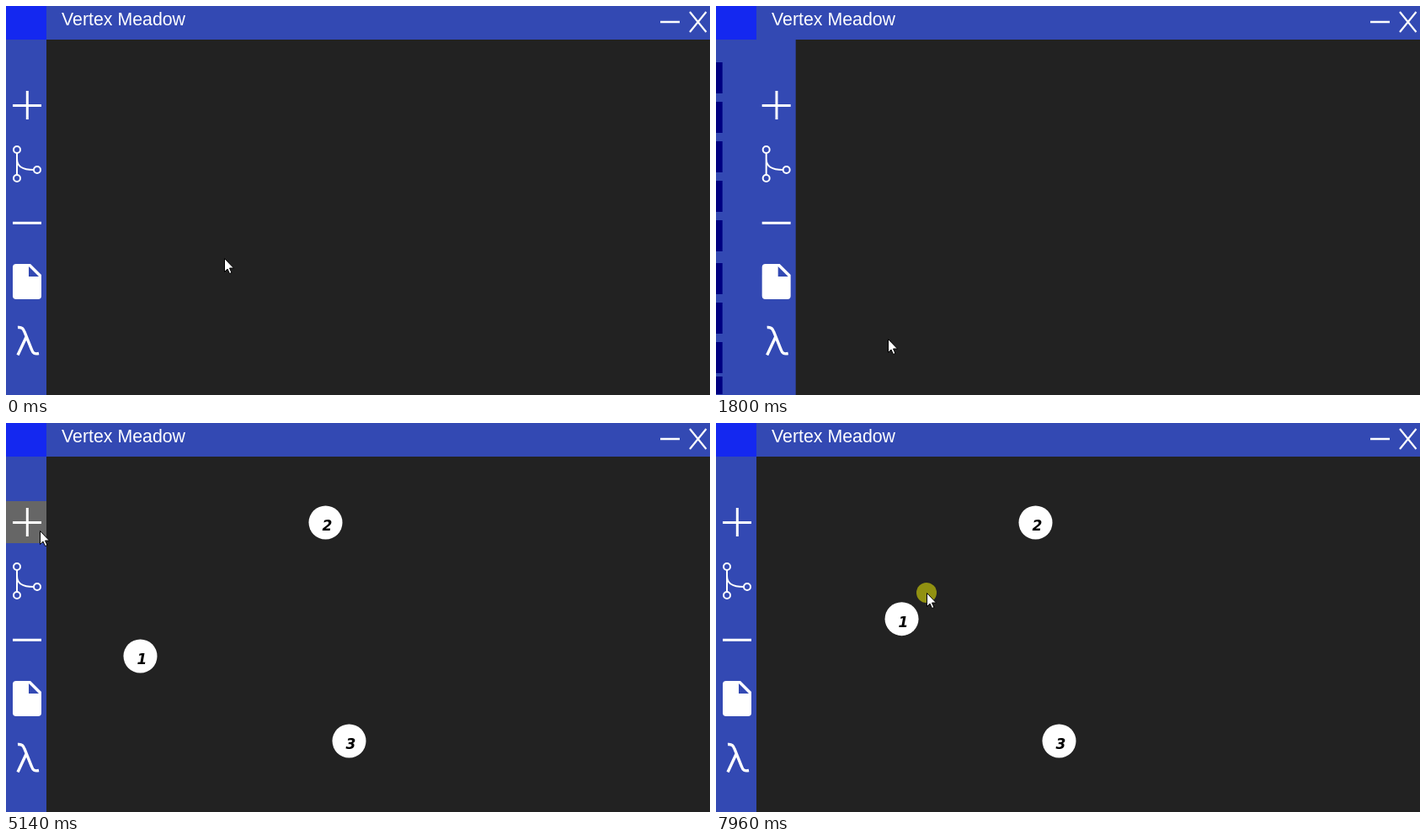
Recreate the animation shown at these times as an HTML page. Size 836x463 px, loop 8 s.

```html
<!DOCTYPE html>
<html lang="en">
<head>
<meta charset="utf-8">
<title>Vertex Meadow</title>
<style>
html, body { margin: 0; width: 100%; height: 100%; overflow: hidden; background: #222; }
svg { display: block; width: 100vw; height: 100vh; }
.title { font: 21.33px "Liberation Sans", Arial, sans-serif; fill: #fff; }
.label { font: 600 15px "Open Sans", "Noto Sans", sans-serif; fill: #fff; text-anchor: middle; }
.digit { font: italic 700 17px "DejaVu Sans", sans-serif; text-anchor: middle; }
.line { fill: none; stroke: #fff; }
</style>
</head>
<body>
<svg viewBox="0 0 836 463" preserveAspectRatio="none">
  <rect width="836" height="463" fill="#222"/>
  <g id="nodes"></g>
  <g id="panel">
    <rect x="-180" y="40" width="228" height="423" fill="#3349b3"/>
    <g id="buttons"></g>
    <rect id="plus" y="93" width="48" height="50" fill="#666"/>
    <rect id="lambda" y="373" width="48" height="50" fill="#666"/>
    <path class="line" stroke-width="3" d="M8 118.500H42M25.300 101V135M8 258.300H42"/>
    <g class="line" stroke-width="2">
      <circle cx="13" cy="171" r="4"/>
      <circle cx="13" cy="205" r="4"/>
      <circle cx="37" cy="195" r="4"/>
      <path d="M13 175V201M13 182C13 191 19 195 33 195"/>
    </g>
    <path fill="#fff" d="M12 307H29L42 320V345Q42 349 38 349H12Q8 349 8 345V311Q8 307 12 307Z"/>
    <path fill="#3349b3" d="M27 310V322H39Z"/>
    <path class="line" stroke-width="3.4" d="M14 382.500C19 382 20.500 384 22 388L30.500 409C32 413.500 34 414.500 39 413.500M24 394L14 415.500"/>
  </g>
  <rect width="836" height="40" fill="#3349b3"/>
  <rect width="48" height="40" fill="#1428f0"/>
  <text class="title" x="66" y="23">Vertex Meadow</text>
  <path class="line" stroke-width="2.5" d="M777 19H800"/>
  <path class="line" stroke-width="2.2" d="M812 7L831.500 31M831.500 7L812 31"/>
  <g id="cursor">
    <circle id="press" cx="-1" cy="-1" r="12" fill="#ff0" fill-opacity=".5"/>
    <path fill="#fff" stroke="#000" d="M-.5 -.5V15.500L3 12L5.500 17.500L8 16.500L5.500 11H10.500Z"/>
  </g>
</svg>
<script>
const LOOP = 8000, STEP = 70, PHASE = 50, CLICK = 100;
const $ = id => document.getElementById(id);

function add(parent, tag, attrs, text = "") {
  const el = document.createElementNS("http://www.w3.org/2000/svg", tag);
  for (const k in attrs) el.setAttribute(k, attrs[k]);
  el.textContent = text;
  return parent.appendChild(el);
}

["Dijkstra", "Connected", "DFS", "BFS", "Ford-Fulkerson", "Colouring",
 "Prim Tree", "Force Algorithm", ". . ."].forEach((name, i) => {
  const y = Math.min(67 + 47 * i + (i > 4 ? 4 : 0), 441);
  const height = Math.min(37, 462 - y);
  add($("buttons"), "rect", { x: -179, y, width: 140, height, fill: "#000080" });
  add($("buttons"), "text", { class: "label", x: -110, y: y + height / 2 + 6 }, name);
});

const nodes = ["1", "2", "3"].map(n => {
  const g = add($("nodes"), "g", {});
  add(g, "circle", { r: 20, fill: "#fff" });
  add(g, "text", { class: "digit", x: 2, y: 9.5 }, n);
  return g;
});

// Where the pointer rests: arrive and leave times, x, y, time of a click
const stops = [
  { until: 130, x: 260, y: 301 },
  { from: 620, until: 910, x: 25, y: 397, click: 840 },
  { from: 1306, until: 1800, x: 205, y: 397, click: 1660 },
  { from: 2430, until: 2570, x: 25, y: 118, click: 2500 },
  { from: 2850, until: 3180, x: 160, y: 278, click: 2970, vertex: true },
  { from: 3600, until: 3930, x: 380, y: 119, click: 3700, vertex: true },
  { from: 4330, until: 4730, x: 408, y: 379, click: 4430, vertex: true },
  { from: 5140, until: 5410, x: 25, y: 118, click: 5340 },
  { from: 5830, until: 6070, x: 165, y: 273 },
  { from: 6210, x: 293, y: 160 },
  { from: 6920, x: 362, y: 113 },
  { from: 7240, x: 380, y: 113 },
  { from: 8060, x: 245, y: 207 }
];
const placed = stops.filter(s => s.vertex);
const GRAB = 5970;

function ease(t, from, until) {
  const u = Math.min(1, Math.max(0, (t - from) / (until - from)));
  return u * u * (3 - 2 * u);
}

function pointer(t) {
  const i = stops.findIndex(s => s.from > t), a = stops[i - 1], b = stops[i];
  const f = ease(t, a.until ?? a.from, b.from);
  return [a.x + (b.x - a.x) * f, a.y + (b.y - a.y) * f];
}

const move = (el, x, y) => el.setAttribute("transform", `translate(${x} ${y})`);
const show = (el, on) => el.setAttribute("visibility", on ? "visible" : "hidden");

function draw(time) {
  const t = Math.floor((time - PHASE) / STEP) * STEP + PHASE;
  const [x, y] = pointer(t);
  const open = 180 * (ease(t, 840, 1050) - ease(t, 1660, 1870));
  const over = top => x >= open && x < open + 48 && y >= top && y < top + 50;
  move($("panel"), open, 0);
  show($("plus"), over(93) || (t >= 2500 && t < 5410));
  show($("lambda"), over(373));
  move($("cursor"), Math.round(x), Math.round(y));
  show($("press"), t >= GRAB || stops.some(s => t >= s.click && t < s.click + CLICK));

  placed.forEach((s, i) => {
    move(nodes[i], s.x - .5, s.y - .5);
    show(nodes[i], t >= s.click);
  });
  if (t >= GRAB) {
    const gap = 4 + 26 * ease(t, 6210, 7000);  // the pointer drifts off the dragged node
    move(nodes[0], x - gap, y + gap);
  }
}

const begin = performance.now();
function tick() {
  draw((performance.now() - begin) % LOOP);
  requestAnimationFrame(tick);
}
tick();
</script>
</body>
</html>
```
